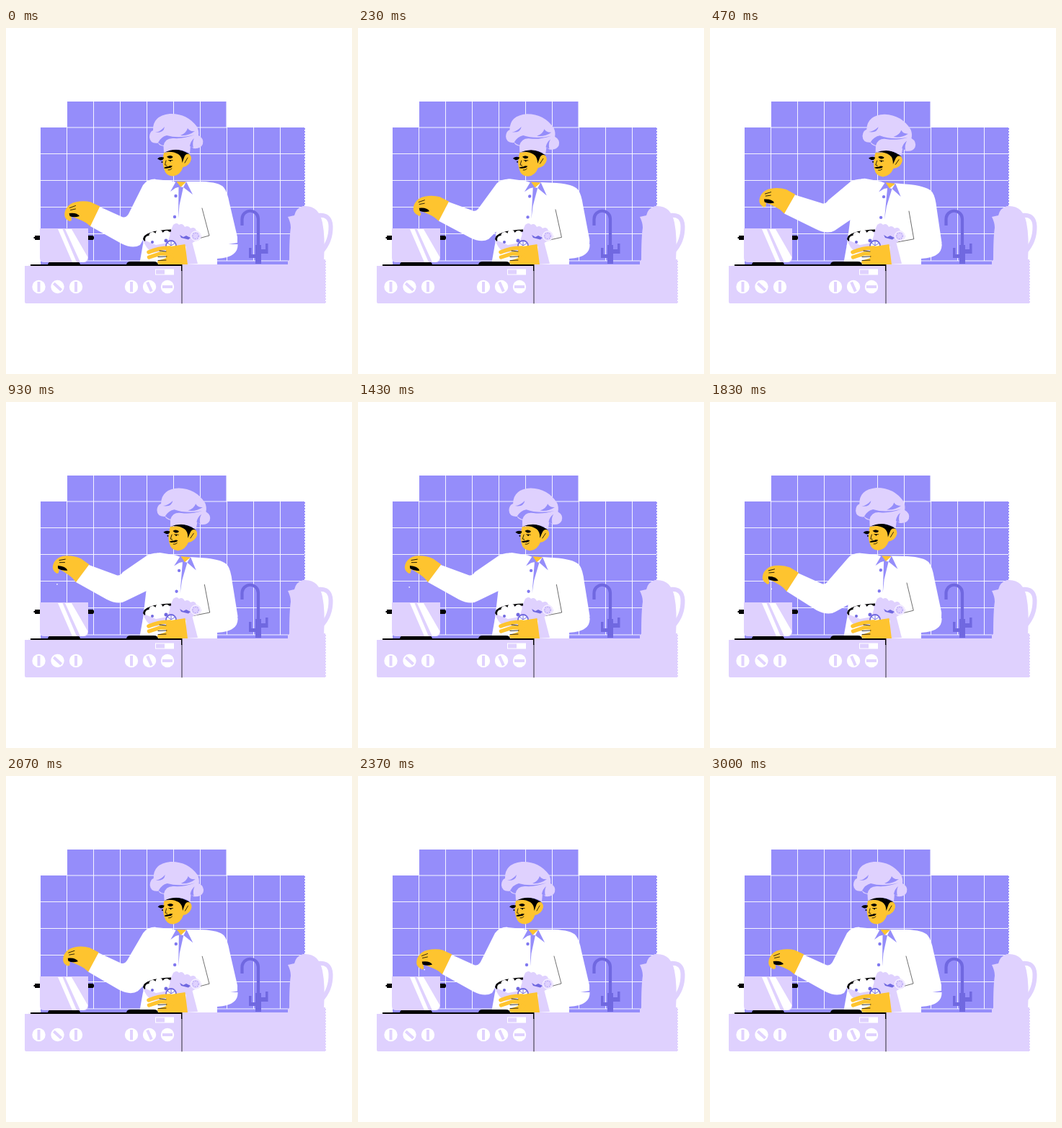
These frames come from a looping animation (480x480 px, 3.03 s). An HTML page:

```html
<!DOCTYPE html>
<html lang="en">
<head>
<meta charset="utf-8">
<title>Chef seasoning a pot</title>
<style>
  html, body { margin: 0; width: 100%; height: 100%; overflow: hidden; background: #fff; }
  svg { display: block; width: 100vw; height: 100vh; }
  .tile { fill: #958dfa; }
  .pale { fill: #dfd1fe; }
  .skin { fill: #fec42f; }
  .deep { fill: #7068e0; }
  .white { fill: #fff; }
  .line { fill: none; stroke: #000; stroke-width: .8; stroke-linecap: round; }
</style>
</head>
<body>
<svg viewBox="0 0 480 480">
  <!-- wall -->
  <path class="tile" d="M85 102H305.5V138H414V323H391V328H48V138H85Z"/>
  <path id="grid" stroke="#fff" stroke-opacity=".9" fill="none"/>
  <path d="M414.5 139V248" stroke="#958dfa" stroke-width="1" stroke-dasharray="2 2"/>

  <!-- tap -->
  <path d="M327.5 274V265A11.25 11.25 0 0 1 350 265V305" fill="none" stroke="#7068e0" stroke-width="4.2"/>
  <path class="deep" d="M346 301H354V307H360V299H363.5V313H354V327H346V319H337V305H340.5V314H346Z"/>

  <!-- kettle -->
  <path d="M433 260Q450 258 450.500 275Q451 296 437 311" fill="none" stroke="#dfd1fe" stroke-width="6"/>
  <path class="pale" d="M391 262L400 260Q402 250 412 247Q424 246 431 253Q437 260 439 270Q443 290 441 322H393Q393 290 395 277Q395 270 391 262Z"/>

  <!-- chef -->
  <path class="white" d="M190 300H321.500Q322 309 315 314Q309 319 293 320V328H185Z"/>
  <g id="body">
    <path class="white" d="M207 210L229 212L236 214L242 221L249 213L272 213Q296 214 302 221Q307 227 310 243L321 290V298L290 303L190 306L193 240Q190 212 207 210Z"/>
    <path class="skin" d="M236 213L250 213.500L242 221Z"/>
    <path class="tile" d="M236 212.500L242 220L235 222L228 227ZM250 213L259 231L246 221ZM239.500 220L246 221L240.500 246L239 264Z"/>
    <circle cx="235.500" cy="233" r="2.200" fill="#8078f0"/>
    <circle cx="234" cy="262" r="2.200" fill="#8078f0"/>
    <path class="line" stroke-opacity=".7" d="M272 250L282 288L256 295"/>
  </g>

  <circle id="salt" class="white" r=".9"/>
  <g id="hand">
    <path class="skin" d="M7 -14L-6 -20Q-16 -22.500 -27 -20Q-36 -18 -40 -11Q-43 -6 -42 0Q-41 3 -38 5L-33 6Q-32 2 -33 0Q-18 5 -12 9L-6 14Z"/>
    <g id="finger">
      <path d="M-36 -4.500Q-25 -6 -21.500 -.5Q-29 2 -35 -.5Z"/>
      <path d="M-38.500 -6L-38.500 1.500L-35.500 4" fill="none" stroke="#fec42f" stroke-width="4.500" stroke-linecap="round"/>
    </g>
    <path class="line" d="M-35 -12L-27 -15M-34 -9L-27 -10.500"/>
  </g>
  <path id="arm" class="white"/>

  <g id="head">
    <path class="skin" d="M219 173Q216 186 219 195Q222 206 232 205.500Q242 204 245.500 193Q255 191 257 182Q257 174 250 174L240 170Z"/>
    <path d="M218.500 172.500Q236 163 255.500 175.500Q249 173 247 180L244.500 187Q244 178 239 175Q231 170 218.500 172.500Z"/>
    <path d="M210 181.500Q213 178 219 179.500Q219 183.500 214 183.500ZM223 178.800Q227 175.500 231.500 178.500Q231 181.500 226 180.800Z"/>
    <path d="M219 194Q223 191.500 225 192.300Q228 190 231 191.500Q229 194.500 225 194.300Q221 195.500 219 194Z"/>
    <circle cx="216.500" cy="186" r="1"/>
    <circle cx="228" cy="184.300" r="1.100"/>
    <path class="line" d="M222 184L220.500 190L223 190.500M225 197Q228 197.500 230 195M225.500 183.500H231M252 180L248 187"/>
    <path class="pale" d="M219 173L218.500 164Q212 163 211 159.500Q200 161 199 151.500Q199 144 204 142Q203 122 227 119Q251 118 265 137Q268 143 267 149Q275 153 273 161Q270 168 260 167L256 164L255 174Q237 164 219 173Z"/>
    <path class="tile" d="M211 159Q215 151 223 149Q240 154 262 148Q246 154 233 153Q221 152 218.500 163Q214 162 211 159ZM207 145Q214 144 220 137Q219 146 207 145ZM242 149Q250 146 252 139Q255 144 262 143Q253 150 242 149ZM255 164Q256 157 261 153Q258 159 260 166Z"/>
  </g>

  <!-- bowl -->
  <path class="pale" d="M250 301L258 296L266 327L248 328Z"/>
  <path class="pale" d="M190 292Q193 281 229 280L232 273Q237 269 240 273Q245 270 248 276Q253 273 256 278Q262 275 264 281Q270 283 271 289Q270 295 262 296L250 303L204 312Q193 306 190 292Z"/>
  <path d="M190 293Q191 281 229 279.500V282.500Q199 284 192.500 296Z"/>
  <path class="white" d="M193.500 295a5 5 0 0 1 5 -7a5 5 0 0 1 9 -3a5 5 0 0 1 10 0a5 5 0 0 1 10 2L224 298L208 301Z"/>
  <g class="deep">
    <circle cx="203" cy="297" r="2"/>
    <circle cx="222" cy="295" r="2.500"/>
    <path d="M241 287L246 290L250 288L256 291L253 293.500L243 291Z"/>
  </g>
  <g fill="#fff" stroke="#7068e0">
    <circle cx="229" cy="302" r="7" stroke-width="1.800"/>
    <path d="M229 302L224 298M229 302V295M229 302L235 298"/>
    <circle cx="263" cy="288.500" r="6.500" class="pale" stroke="#fff"/>
    <circle cx="263" cy="288.500" r="4" fill="none" stroke-width=".8" stroke-dasharray="1 2"/>
  </g>
  <path class="skin" d="M222 304L248.500 300L252 328H217Q211 328 210 325L222 320Z"/>
  <path d="M198 311Q212 305 226 305L226 308M198.500 318L214 313L228 313M213 325L230 319" fill="none" stroke="#fec42f" stroke-width="5.500" stroke-linecap="round"/>
  <path class="line" d="M213 309L222 310M211 317.500L223 317M211 322.500L222 322" stroke="#40358c"/>

  <!-- worktop -->
  <path class="pale" d="M26 330H244V328H391V323L394 321H443V382H28Q26 382 26 380Z"/>
  <path d="M443.500 323V382" stroke="#dfd1fe" stroke-width="1" stroke-dasharray="2 2"/>
  <path d="M34 328H244.500V337H243V330H34ZM58 329Q58 324 64 324H97Q103 324 103 329ZM167 329Q167 324 173 324H205Q211 324 211 329Z"/>
  <path class="line" d="M244 337V382"/>
  <rect x="207.500" y="335" width="25" height="7" fill="none" stroke="#fff"/>
  <rect class="white" x="220" y="335" width="13" height="7"/>
  <g id="knobs"></g>

  <!-- pot -->
  <path d="M40 288H47V294H40V292H38.500V290H40ZM114 288H121L122 290V292L121 294H114Z"/>
  <path class="pale" d="M47 278H114V319Q114 325 108 325H53Q47 325 47 319Z"/>
  <path class="white" d="M72 279H78.500L98 325H92ZM82 279H91L113.500 318Q113 324 107 325H103Z"/>
</svg>
<script>
const $ = id => document.getElementById(id);
const set = (id, name, value) => $(id).setAttribute(name, value);

let grid = 'M85 138H306M48 323H391';
for (let i = 0; i < 9; i++) {
  const x = 84.5 + i * 37;
  grid += `M${x} ${i > 0 && i < 6 ? 102 : 138}V323`;
}
for (let i = 0; i < 4; i++) grid += `M48 ${174.5 + i * 37}H414`;
set('grid', 'd', grid);

$('knobs').innerHTML = [[45.5, 0], [71.5, -48], [97, 0], [174, 0], [199, -24], [224, 90]]
  .map(([x, a]) => `<g transform="translate(${x} 359) rotate(${a})"><circle r="9.2" class="white"/>
    <rect x="-2" y="-7" width="4" height="14" class="pale"/></g>`).join('');

// time, lean, wrist x y, wrist angle, crook x y, elbow x y, armpit x y
const rest = [0, 123.5, 261.5, 0, 166, 264, 176, 307, 190, 294];
const raised = [1, 106, 238, 11, 158, 242, 156, 282, 195, 262];
const shaken = [1, 103, 241, 5, 157, 244, 156, 283, 195, 263];
const keys = [
  [0, ...rest],
  [470, 1.2, 110.5, 244.5, 4, 160, 245, 163, 287, 195, 266],
  [690, ...shaken],
  [930, ...raised],
  [1180, ...shaken],
  [1430, ...raised],
  [1630, 1, 105.5, 240, 8, 158, 244, 157, 284, 195, 264],
  [1830, .3, 114.5, 250, 7, 160, 254, 164, 297, 194, 280],
  [2250, ...rest],
  [3030, ...rest]
];

// Monotone cubic interpolation: smooth through each key, no overshoot.
const slope = (i, c) => (keys[i + 1][c] - keys[i][c]) / (keys[i + 1][0] - keys[i][0]);
function tangent(i, c) {
  if (i === 0 || i === keys.length - 1) return 0;
  const a = slope(i - 1, c), b = slope(i, c);
  return a * b > 0 ? 2 * a * b / (a + b) : 0;
}
function pose(t) {
  const i = keys.findIndex((k, n) => n < keys.length - 1 && t < keys[n + 1][0]);
  const span = keys[i + 1][0] - keys[i][0], u = (t - keys[i][0]) / span;
  return rest.map((_, n) => {
    const c = n + 1, v = 1 - u;
    return keys[i][c] * (1 + 2 * u) * v * v + keys[i + 1][c] * u * u * (3 - 2 * u)
      + span * u * v * (tangent(i, c) * v - tangent(i + 1, c) * u);
  });
}

function draw(t) {
  const [lean, wx, wy, angle, cx, cy, ex, ey, px, py] = pose(t);

  for (const id of ['body', 'head']) set(id, 'transform', `rotate(${4 * lean} 225 300)`);

  const r = angle * Math.PI / 180, cos = Math.cos(r), sin = Math.sin(r);
  const dx = 6.5 * cos + 13.5 * sin, dy = 6.5 * sin - 13.5 * cos;
  const s = 4 * lean;
  set('arm', 'd', `M${wx + dx} ${wy + dy}L${cx - 5} ${cy - 2}Q${cx} ${cy} ${cx + 4} ${cy - 6}
    L${190 + s} ${218 - s}Q${196 + s} 209.500 ${207 + s} 209.500L${224 + s} 230L200 292L${px} ${py}
    L${ex + 10} ${ey - 6}Q${ex} ${ey} ${ex - 16} ${ey - 8}L${wx - dx} ${wy - dy}Z`);
  set('hand', 'transform', `translate(${wx} ${wy}) rotate(${angle})`);
  const rub = 1.2 - 1.2 * Math.cos(t / 3030 * 12 * Math.PI);
  set('finger', 'transform', `translate(${rub * .7} ${rub * .3})`);

  const fall = ((t + 90) % 470) * .0037;
  const top = 262 - 20 * Math.min(lean, 1);
  set('salt', 'cx', 91 - 21 * lean + 3 * fall);
  set('salt', 'cy', top + (278 - top) * fall);
  set('salt', 'opacity', t > 600 && fall < 1 ? 1 : 0);
}

function tick() {
  draw(performance.now() % 3030);
  requestAnimationFrame(tick);
}
tick();
</script>
</body>
</html>
```
